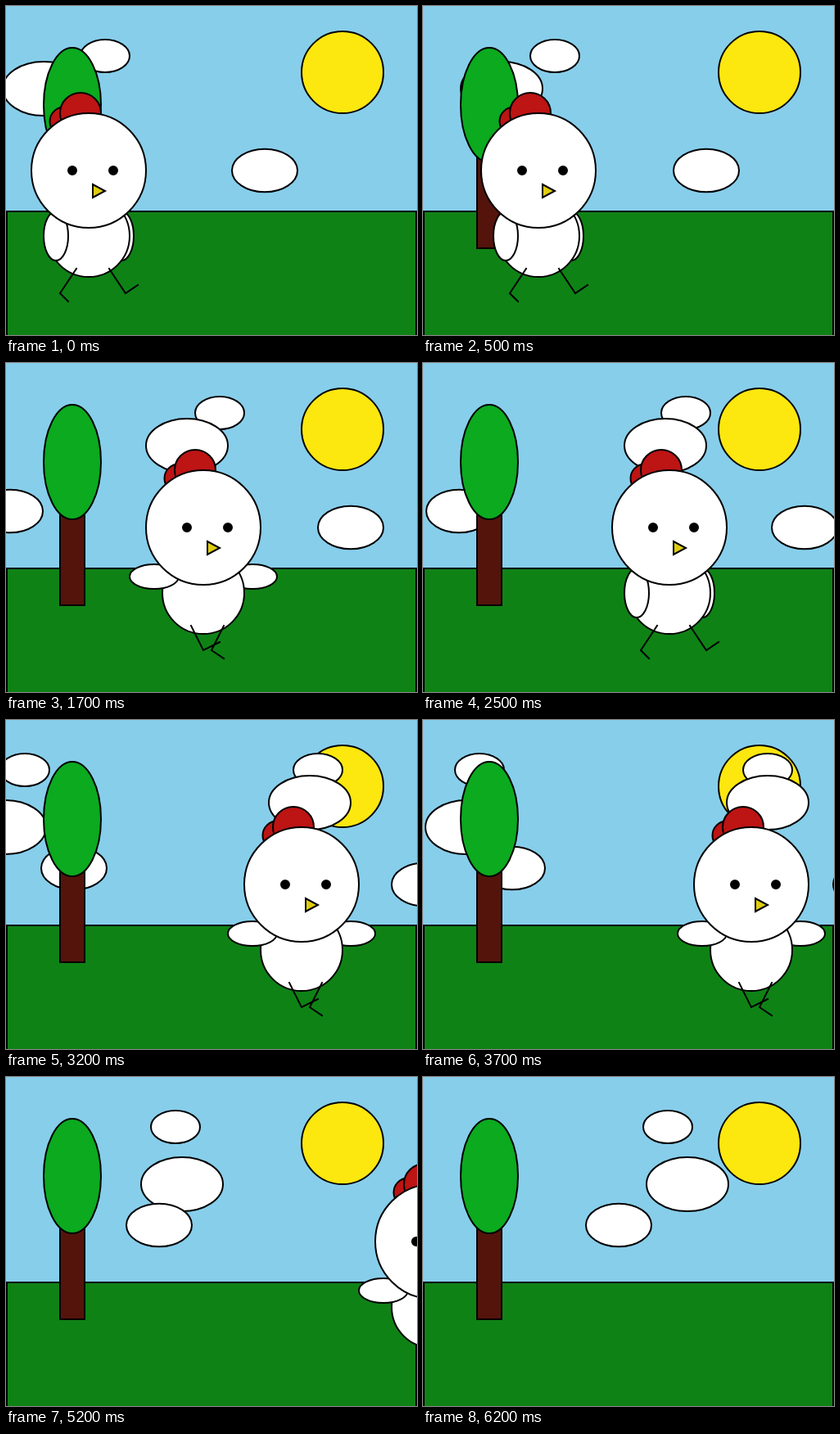
An HTML page that plays this animation: 502 px wide and 402 px high, repeating every 6.6 s.

```html
<!DOCTYPE html>
<html lang="en">
<head>
<meta charset="utf-8">
<title>Walking chicken</title>
<style>
  html, body { margin: 0; width: 100%; height: 100%; overflow: hidden; background: #87ceeb; }
  svg { display: block; width: 502px; height: 402px; }
</style>
</head>
<body>
<svg viewBox="0 0 502 402" stroke="#000" stroke-width="2" fill="#fff">
  <rect width="502" height="402" fill="#87ceeb" stroke="none"/>
  <circle cx="411" cy="81" r="50" fill="#fce70f"/>
  <rect x="1" y="251" width="500" height="160" fill="#0f8216"/>
  <g id="clouds"></g>
  <rect x="66" y="171" width="30" height="125" fill="#54140c"/>
  <ellipse cx="81" cy="121" rx="35" ry="70" fill="#0baa1f"/>

  <!-- x = 0 is the middle of the chicken -->
  <g id="chicken">
    <ellipse id="farWing"/>
    <circle cy="281" r="50"/>
    <ellipse id="nearWing"/>
    <path id="legs" fill="none" stroke-linecap="square"/>
    <g fill="#bd1414">
      <circle cx="-30" cy="141" r="17.5"/>
      <circle cx="-10" cy="131" r="25"/>
    </g>
    <circle cy="201" r="70"/>
    <g fill="#000">
      <circle cx="-20" cy="201" r="5"/>
      <circle cx="30" cy="201" r="5"/>
    </g>
    <path d="M5 218V234L20 226Z" fill="#dfcd10"/>
  </g>
</svg>
<script>
const LOOP = 6600, LAST_STEP = 25;
const $ = id => document.getElementById(id);

function setAttrs(el, attrs) {
  for (const key in attrs) el.setAttribute(key, attrs[key]);
}

// Clouds from back to front: start x, pixels per step, y, radii
const clouds = [
  [121, 20, 61, 30, 20],
  [46, 25, 101, 50, 33],
  [316, 15, 201, 40, 26.3],
  [-276, 23, 61, 30, 20],
  [-352, 27, 131, 50, 33],
  [-86, 13, 181, 40, 26.3]
].map(([x, speed, cy, rx, ry]) => {
  const el = document.createElementNS($("clouds").namespaceURI, "ellipse");
  setAttrs(el, { cy, rx, ry });
  $("clouds").append(el);
  return { el, x, speed };
});

const poses = [
  {
    wing: { cy: 281, rx: 15, ry: 30 }, reach: 40,
    legs: "M-15 321L-35 351L-25 361M25 321L45 351L60 341"
  },
  {
    wing: { cy: 261, rx: 30, ry: 15 }, reach: 60,
    legs: "M-15 321L0 351L20 341M25 321L10 351L25 361"
  }
];

// Steps alternate between 200 ms and 300 ms; the last one is held.
function stepAt(ms) {
  const t = ms % LOOP;
  const step = 2 * Math.floor(t / 500) + (t % 500 >= 200 ? 1 : 0);
  return Math.min(step, LAST_STEP);
}

function draw(step) {
  for (const { el, x, speed } of clouds) el.setAttribute("cx", x + speed * step);
  const { wing, reach, legs } = poses[step % 2];
  setAttrs($("chicken"), { transform: `translate(${101 + 20 * step} 0)` });
  setAttrs($("nearWing"), { ...wing, cx: -reach });
  setAttrs($("farWing"), { ...wing, cx: reach });
  setAttrs($("legs"), { d: legs });
}

const start = performance.now();
function tick() {
  draw(stepAt(performance.now() - start));
  requestAnimationFrame(tick);
}
tick();
</script>
</body>
</html>
```
